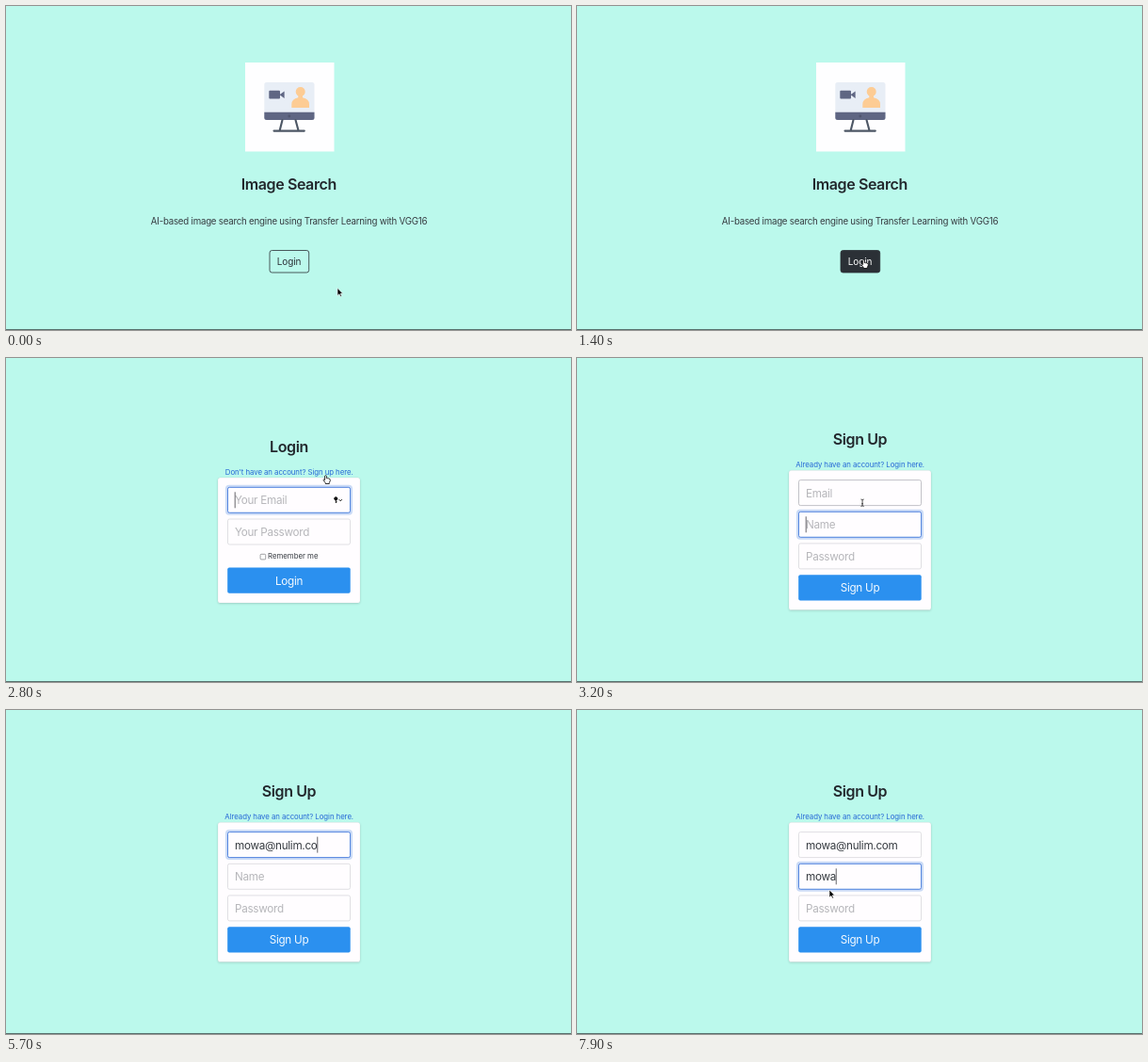
Write an HTML page that moves like this. It is 600 px wide and 344 px high and loops after 8 s.

```html
<!DOCTYPE html>
<html lang="en">
<head>
<meta charset="utf-8">
<title>Image Search</title>
<style>
  html, body { margin: 0; width: 100%; height: 100%; overflow: hidden; background: #bbf9ec; }
  svg { display: block; width: 600px; height: 344px; }
  text { font-family: Inter, Roboto, sans-serif; font-optical-sizing: none; fill: #363b40; white-space: pre; }
  .title { font-size: 16px; font-weight: 600; letter-spacing: -.025em; fill: #22272c; text-anchor: middle; }
  .lead { font-size: 9.7px; letter-spacing: -.022em; text-anchor: middle; }
  .btn { font-size: 10px; letter-spacing: -.01em; text-anchor: middle; fill: #2b3036; }
  .link { font-size: 7.8px; letter-spacing: -.007em; text-anchor: middle; fill: #2668d6; }
  .field { font-size: 11.7px; letter-spacing: -.024em; }
  .big { font-size: 11.7px; letter-spacing: -.024em; text-anchor: middle; fill: #f4faff; }
  .small { font-size: 7.8px; }
  .card { fill: #fffdff; stroke: rgba(10,10,10,.1); stroke-width: .5; filter: drop-shadow(0 1px .8px rgba(10,10,10,.14)); }
  .input { fill: #fffdff; stroke: #d9d8dc; stroke-width: .8; }
  .input.hover { stroke: #b3b3b9; }
  .input.focus { stroke: #5f8be0; stroke-width: 1; }
  .glow { fill: none; stroke: rgba(50,115,220,.25); stroke-width: 3; display: none; }
  .focus + .glow { display: block; }
  .empty { fill: #b6b6ba; }
</style>
</head>
<body>
<svg viewBox="0 0 600 344">
  <rect width="600" height="344" fill="#bbf9ec"/>
  <g id="pages"></g>
  <line id="caret" stroke="#55555a" stroke-width=".9"/>
  <g id="pointer" stroke-linejoin="round">
    <path id="arrow" d="M0 0V8L1.9 6.3L3.1 9L4.4 8.4L3.2 5.8H5.6Z" fill="#000" stroke="#fff" stroke-width=".6"/>
    <path id="hand" d="M-.9 .8Q0-.5 .9 .8V3.2Q1.8 2.7 2.3 3.4Q3.2 3 3.6 3.8Q4.8 3.6 4.8 4.9Q4.9 6.6 3.8 7.8V9H-.3V8Q-1.7 6.6-2.5 4.9Q-2.2 3.8-.9 5Z" fill="#fff" stroke="#000" stroke-width=".8"/>
    <path id="beam" d="M-1.6-3.7Q0-3.7 0-2.8Q0-3.7 1.6-3.7M0-2.8V2.8M-1.6 3.7Q0 3.7 0 2.8Q0 3.7 1.6 3.7M-.9 1H.9" fill="none" stroke="#222" stroke-width=".8"/>
  </g>
  <rect y="343" width="600" height="1" fill="#58736f"/>
</svg>
<script>
const LOOP = 8000, STEP = 100;
const LOGIN_AT = 1600, SIGNUP_AT = 2900, EMAIL_AT = 3400, NAME_AT = 6500;
const HIDE_AT = 3650, SHOW_AT = 7650;

const typed = {
  email: { text: 'mowa@nulim.com', times: [3700, 3820, 3930, 4050, 4500, 4750, 4880, 5000, 5120, 5250, 5400, 5550, 5650, 5900] },
  name: { text: 'mowa', times: [7100, 7350, 7450, 7560] }
};
const events = [LOGIN_AT, SIGNUP_AT, EMAIL_AT, NAME_AT, ...typed.email.times, ...typed.name.times];

// time, x, y
const path = [
  [0, 352, 299.5], [200, 352, 299.5], [800, 304.5, 269.5], [1650, 304.5, 269.5],
  [1900, 312, 250], [2250, 339.5, 124.5], [2850, 339.5, 124.5], [3150, 304, 155],
  [3350, 298, 147], [7600, 290, 147], [7900, 268, 191]
];

const $ = id => document.getElementById(id);
const label = (cls, x, y, str, id = '') => `<text class="${cls}" x="${x}" y="${y}" id="${id}">${str}</text>`;
const box = (x, y, w, h, r, attrs) => `<rect x="${x}" y="${y}" width="${w}" height="${h}" rx="${r}" ${attrs}/>`;

const input = (id, y, hint) =>
  box(235.5, y, 130, 27, 1.9, `class="input" id="${id}"`) +
  box(234.5, y - 1, 132, 29, 2.5, 'class="glow"') +
  label('field empty', 243, y + 18, hint, id + 'Text');

const submit = (y, str) => box(235.2, y, 130.5, 27.2, 1.9, 'fill="#2b90ef"') + label('big', 300.5, y + 18, str);

const form = (top, height, title, link, body) =>
  label('title', 300.5, top - 27.4, title) + label('link', 300.7, top - 3.3, link) +
  box(225, top, 151, height, 2.6, 'class="card"') + body;

const picture = `
  <rect x="254" y="60" width="94.5" height="94.5" fill="#fefeff"/>
  <rect x="274.3" y="81" width="53.2" height="40" rx="2.5" fill="#e8eef6"/>
  <path d="M274.3 112.8H327.5V118.5Q327.5 121 325 121H276.8Q274.3 121 274.3 118.5Z" fill="#5f6683"/>
  <circle cx="300.8" cy="117" r="1.4" fill="#50566f"/>
  <path d="M293.5 121L290.6 132.5M307.5 121L310.6 132.5M284.5 132.6H316.8" fill="none" stroke="#4d5765" stroke-width="2.1" stroke-linecap="round"/>
  <rect x="279.3" y="89.8" width="11.7" height="8.8" rx="1" fill="#5f6683"/>
  <path d="M290.5 94.2L295.6 90.5V98Z" fill="#5f6683"/>
  <g fill="#fdcc94"><circle cx="312.7" cy="91" r="5"/>
  <path d="M310.3 94H315V97.3Q322 98.5 322 104.5V108H303.3V104.5Q303.3 98.5 310.3 97.3Z"/></g>`;

const keyIcon = `<g fill="none" stroke="#111" stroke-width="1">
  <circle cx="350.3" cy="149.3" r="1.6" fill="#111"/><path d="M350.3 150V154M350.3 152.8H351.6M353.6 150.2L355.2 151.8L356.8 150.2"/></g>`;

$('pages').innerHTML =
  `<g id="home">${picture}
    ${label('title', 300.3, 194.6, 'Image Search')}
    ${label('lead', 300.5, 232.3, 'AI-based image search engine using Transfer Learning with VGG16')}
    ${box(280, 259.5, 41.7, 23.5, 2.5, 'id="enter" stroke="#2b3036" stroke-width=".8"')}
    ${label('btn', 300.6, 274.8, 'Login', 'enterText')}</g>
  <g id="login">${form(127, 133, 'Login', "Don't have an account? Sign up here.",
    input('user', 137.3, 'Your Email') + keyIcon + input('pass', 171, 'Your Password') +
    box(270.1, 208.3, 5.6, 5.6, 1, 'fill="#fff" stroke="#77777b" stroke-width=".7"') +
    label('small', 278, 213.4, 'Remember me') + submit(222.5, 'Login'))}</g>
  <g id="signup">${form(119.3, 148.2, 'Sign Up', 'Already have an account? Login here.',
    input('email', 129.6, 'Email') + input('name', 163.3, 'Name') +
    input('secret', 196.9, 'Password') + submit(230.3, 'Sign Up'))}</g>`;

const hints = { email: 'Email', name: 'Name' };
const show = (id, on) => { $(id).style.display = on ? '' : 'none'; };
const inside = (p, x, y, w, h) => p.x >= x && p.x <= x + w && p.y >= y && p.y <= y + h;

function pointerAt(t) {
  const i = path.findIndex(k => k[0] > t);
  if (i < 0) return { x: path.at(-1)[1], y: path.at(-1)[2] };
  const [a, b] = [path[i - 1], path[i]];
  const u = (t - a[0]) / (b[0] - a[0]), e = u * u * (3 - 2 * u);
  return { x: a[1] + (b[1] - a[1]) * e, y: a[2] + (b[2] - a[2]) * e };
}

function drawPointer(t, page) {
  const p = pointerAt(t), visible = t < HIDE_AT || t >= SHOW_AT;
  let kind = 'arrow';
  const onButton = page === 'home' && inside(p, 280, 259, 42, 24);
  if (onButton) kind = 'hand';
  const linkY = { login: 116, signup: 108.3 }[page];
  if (linkY && inside(p, 232, linkY, 137, 10.5)) kind = 'hand';
  for (const el of document.querySelectorAll(`#${page} .input`)) {
    const over = visible && inside(p, 235.5, +el.getAttribute('y'), 130, 27);
    el.classList.toggle('hover', over);
    if (over) kind = 'beam';
  }
  for (const k of ['arrow', 'hand', 'beam']) show(k, k === kind);
  show('pointer', visible);
  $('pointer').setAttribute('transform', `translate(${p.x} ${p.y})`);
  $('enter').setAttribute('fill', onButton ? '#2b3036' : 'none');
  $('enterText').style.fill = onButton ? '#fff' : '';
}

function drawFields(t, page) {
  for (const id in typed) {
    const n = typed[id].times.filter(k => k <= t).length, el = $(id + 'Text');
    el.textContent = n ? typed[id].text.slice(0, n) : hints[id];
    el.classList.toggle('empty', !n);
  }
  const focus = page === 'login' ? 'user' : t >= EMAIL_AT && t < NAME_AT ? 'email' : 'name';
  for (const el of document.querySelectorAll('.input')) el.classList.toggle('focus', el.id === focus);

  const last = Math.max(...events.filter(k => k <= t));
  const on = page !== 'home' && (t - last) % 1000 < 500;
  show('caret', on);
  if (!on) return;
  const text = $(focus + 'Text'), y = +$(focus).getAttribute('y');
  const x = 243.2 + (text.classList.contains('empty') ? 0 : text.getComputedTextLength());
  for (const [k, v] of Object.entries({ x1: x, x2: x, y1: y + 5, y2: y + 22 })) $('caret').setAttribute(k, v);
}

function draw(now) {
  const t = Math.floor((now % LOOP) / STEP) * STEP;
  const page = t < LOGIN_AT ? 'home' : t < SIGNUP_AT ? 'login' : 'signup';
  for (const id of ['home', 'login', 'signup']) show(id, id === page);
  drawFields(t, page);
  drawPointer(t, page);
}

const start = performance.now();
function tick() {
  draw(performance.now() - start);
  requestAnimationFrame(tick);
}
tick();
</script>
</body>
</html>
```
